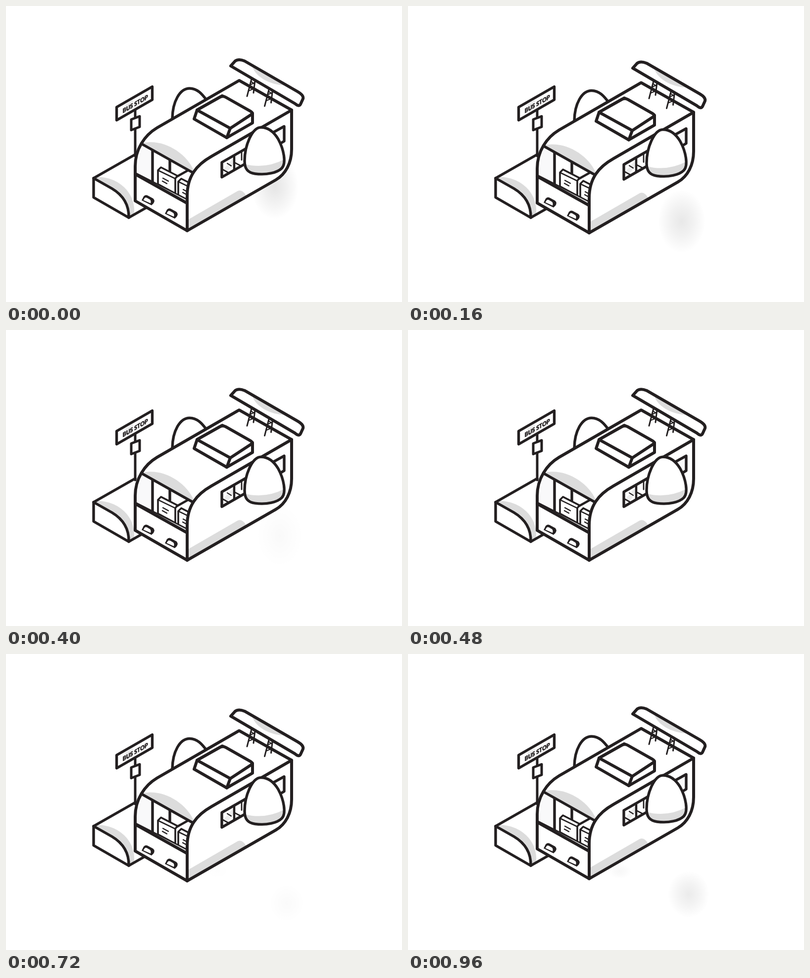
These frames come from a looping animation (800 px wide and 600 px high, 1000 ms). An HTML page with a canvas:

```html
<!DOCTYPE html>
<html lang="en">
<head>
<meta charset="utf-8">
<title>Bus stop</title>
<style>
html, body { margin: 0; width: 100%; height: 100%; overflow: hidden; background: #fff; }
canvas { display: block; }
</style>
</head>
<body>
<canvas id="stage" width="800" height="600"></canvas>
<script>
const ctx = document.getElementById('stage').getContext('2d');
const INK = '#231f20', GREY = '#dcdcdc', PALE = '#f9f9fa', WHITE = '#fff';
const BOLD = 6, MID = 5.4;
const LOOP = 1000, STEP = 40, BOB = 960;

function shape(d, fill, width) {
  const p = new Path2D(d);
  if (fill) {
    ctx.fillStyle = fill;
    ctx.fill(p);
  }
  if (width) {
    ctx.strokeStyle = INK;
    ctx.lineWidth = width;
    ctx.stroke(p);
  }
}

function at(x, y, draw) {
  ctx.save();
  ctx.translate(x, y);
  draw();
  ctx.restore();
}

function clipped(d, draw) {
  ctx.save();
  ctx.clip(new Path2D(d));
  draw();
  ctx.restore();
}

function puff(x, y, rx, ry, alpha) {
  if (alpha <= 0) return;
  at(x, y, () => {
    ctx.scale(rx, ry);
    const g = ctx.createRadialGradient(0, 0, 0, 0, 0, 1);
    g.addColorStop(0, `rgba(0,0,0,${alpha})`);
    g.addColorStop(0.45, `rgba(0,0,0,${alpha * 0.6})`);
    g.addColorStop(1, 'rgba(0,0,0,0)');
    ctx.fillStyle = g;
    ctx.fillRect(-1, -1, 2, 2);
  });
}

const ramp = (t, a, b) => Math.min(1, Math.max(0, (t - a) / (b - a)));

function smoke(t) {
  puff(543, 366 - t * 0.08, 48, 66, 0.1 * (1 - ramp(t, 0, 140)));
  puff(553, 449 - t * 0.08, 48, 64, 0.09 * ramp(t, 20, 140) * (1 - ramp(t, 280, 440)));
  const late = ramp(t, 640, 960);
  puff(567, 505 - (t - 720) * 0.075, 34 + 8 * late, 36 + 12 * late, 0.08 * late);
  puff(428, 440, 24, 16, 0.03 * late);
}

function platform() {
  shape('M177 349L261 301L300 330L300 400L248 429L177 388Z', WHITE);
  shape('M180 347C220 343 264 374 259 423L248 429L215 385Z', GREY);
  shape('M177 349L261 301M248 429L290 405', null, MID);
  shape('M177 349L214 370Q249 391 248 429L177 388Z', WHITE, MID);
}

function sign() {
  shape('M261 212V304', null, 5);
  shape('M253 230L270 223.5V245L253 251.5Z', WHITE, 5);
  shape('M223.5 205L295.5 163.5V190L223.5 231.5Z', WHITE, MID);
  shape('M241 198L257 189V208L241 217Z', '#eee');
  ctx.save();
  ctx.transform(0.866, -0.5, 0, 1, 235.5, 217.5);
  ctx.font = '900 12.3px Lato, "Open Sans", sans-serif';
  ctx.fillStyle = ctx.strokeStyle = INK;
  ctx.lineWidth = 0.5;
  ctx.fillText('BUS STOP', 0, 0);
  ctx.strokeText('BUS STOP', 0, 0);
  ctx.restore();
}

function seat() {
  shape('M307 333L313 327L346 344L342 350V380L307 361Z', WHITE, 3.6);
  shape('M307 333L342 350', null, 2.6);
  shape('M317 349L328 355M316 355L325 360', null, 2.4);
}

function windshield() {
  const glass = 'M261 341Q262 302 275 280L376 337Q366 355 366 400Z';
  clipped(glass, () => {
    shape(glass, WHITE);
    shape('M261 341L275 280L296 291V362Z', PALE);
    shape('M296 290V362M331 310V336', null, MID);
    shape('M343 347L368 333', null, 4.5);
    seat();
    at(41, 23, seat);
    shape('M261 337L366 392V400L261 341Z', GREY);
    shape('M261 338L366 392', null, 2.8);
  });
  shape('M275 280L376 337', null, MID);
  shape('M261 341L366 400', null, BOLD);
}

function lamp() {
  shape('M274 394L278 386Q281 382 286 384L297 390Q302 394 298 400L294 404Z', INK);
  shape('M277.5 393.5L280 389.5Q282 387.5 285 389L291 392.5Q293.5 395 292 400Z', WHITE);
}

function strut() {
  shape('M496 148L487 183M503 151L500 176', null, 3);
  shape('M495 153L502 158M493 160L501 156M492 165L501 170M490 172L500 168', null, 2.2);
}

function wing() {
  const blade = 'M454 121.5L463 111.5Q470 106.5 482 111.5L589 173.5Q602 181 600 188L595 199Q592 205 584 198Z';
  shape(blade, WHITE);
  clipped(blade, () => shape('M496 117C500 142 532 161 568 161Z', GREY));
  shape(blade, null, BOLD);
}

function hatch() {
  shape('M386 211L380 229L446 267L498 237V217L437 182Z', WHITE, BOLD);
  shape('M386 211L432 185Q438 181.5 444 185L494 213.5Q500 217 494 221L453 248Z', WHITE, BOLD);
  shape('M453 248L446 267', null, BOLD);
}

function sideWindows() {
  const left = 'M436 317L490 286V316L436 347Z';
  shape(left, WHITE);
  clipped(left, () => {
    shape('M439 331L461 306V318L446 338Z', '#ececec');
    shape('M461 300V336', null, 4.5);
    shape('M437 331L455 341M463 318L482 328M476 294V312', null, 2.8);
    shape('M447 319L455 324', null, 2.2);
  });
  shape(left, null, MID);
  shape('M535 259L562 244V274L535 290Z', PALE, MID);
}

function pod() {
  const egg = 'M515 246C497 246 482 284 482 314C482 331 489 338 503 340' +
    'C527 343 548 338 557 329C567 319 561 290 550 270C540 253 528 246 515 246Z';
  shape(egg, WHITE);
  clipped(egg, () => shape('M480 320Q525 332 566 309V348H480Z', GREY));
  shape(egg, null, MID);
}

function bus() {
  shape('M336 228C336.5 194 351 167 371 167C386 167 396 178 406 192', WHITE, MID);
  const shell = 'M261 395V325C261 290 280 262 305 247L471 151L577 211V290' +
    'C577 318 565 341 545 352.5L366 455.5Z';
  shape(shell, WHITE);
  shape('M276 278C316 268 364 297 379 333L375 337Z', GREY);
  windshield();
  shape('M368 433L468 375Q477 371 485 384L368 451Z', GREY);
  sideWindows();
  shape('M366 455.5V385C366 345 385 322 415 305L577 211', null, BOLD);
  shape(shell, null, BOLD);
  lamp();
  at(47, 27, lamp);
  hatch();
  wing();
  strut();
  at(35.5, 20, strut);
  pod();
}

// Steady up-and-down drift, lowest point at 440 ms.
function bob(t) {
  const away = Math.abs((t + 40) % BOB - BOB / 2);
  return 12.3 - away * 0.028;
}

function render(t) {
  ctx.fillStyle = WHITE;
  ctx.fillRect(0, 0, 800, 600);
  ctx.lineJoin = 'round';
  ctx.lineCap = 'round';
  smoke(t);
  platform();
  sign();
  at(0, bob(t), bus);
}

const start = performance.now();
function tick() {
  const t = (performance.now() - start) % LOOP;
  render(Math.floor(t / STEP) * STEP);
  requestAnimationFrame(tick);
}
tick();
</script>
</body>
</html>
```
